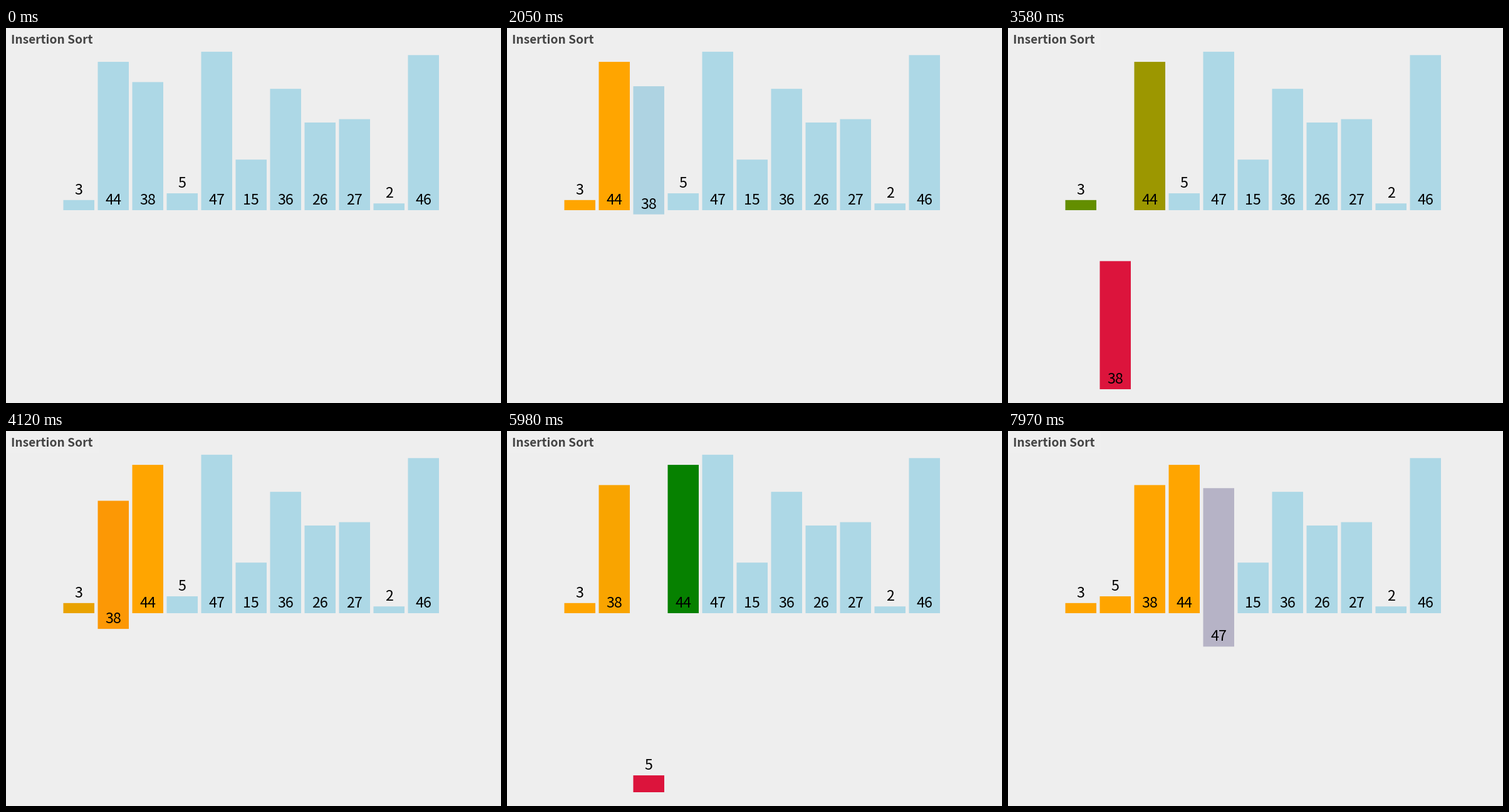
Animation of 790 by 599 pixels, one loop 8000 ms. Source, as a matplotlib script:

```python
import matplotlib.pyplot as plt
import numpy as np
from matplotlib.animation import FuncAnimation
from matplotlib.colors import to_rgb
from matplotlib.patches import Rectangle

W, H, DPI = 790, 599, 100
LOOP, TICK = 8000, 20
VALUES = [3, 44, 38, 5, 47, 15, 36, 26, 27, 2, 46]
X0, STEP, BAR_W = 91.5, 55, 49.5
BASE, DROP, UNIT = 291, 286, 5.385
IDLE, SORTED, ACTIVE, KEY = map(to_rgb, ("lightblue", "orange", "green", "crimson"))

# Steps begin at a fixed pace; each transition is redrawn every REDRAW ms.
FIRST, PACE, MOVE, REDRAW = -10, 493, 250, 45


def sort_states():
    """Yield rows of (slot, drop, r, g, b) per bar after each step of the sort."""
    state = np.array([(i, 0, *IDLE) for i in range(len(VALUES))], float)
    order = list(range(len(VALUES)))
    yield state.copy()
    state[0, 2:] = SORTED
    yield state.copy()
    for i in range(1, len(order)):
        key = order[i]
        state[key, 1:] = 1, *KEY
        yield state.copy()
        j, last = i - 1, None
        while j >= 0:
            bar = order[j]
            if last is not None:
                state[last, 2:] = SORTED
            state[bar, 2:] = ACTIVE
            last = bar
            yield state.copy()
            if VALUES[bar] <= VALUES[key]:
                break
            order[j], order[j + 1] = key, bar
            state[bar, 0], state[key, 0] = j + 1, j
            yield state.copy()
            j -= 1
        state[last, 2:] = SORTED
        state[key, 1:] = 0, *SORTED
        yield state.copy()


STATES = list(sort_states())


def ease(t):
    """Cubic in-out."""
    t = min(t, 1)
    return 4 * t**3 if t < 0.5 else 1 - 4 * (1 - t) ** 3


def state_at(ms):
    k, elapsed = divmod(ms - FIRST, PACE)
    p = ease(elapsed // REDRAW * REDRAW / MOVE)
    return STATES[k] * (1 - p) + STATES[k + 1] * p


def px(size):
    return size * 72 / DPI


plt.rcParams["font.family"] = "Noto Sans CJK JP"
fig = plt.figure(figsize=(W / DPI, H / DPI), dpi=DPI, facecolor="#eeeeee")
ax = fig.add_axes([0, 0, 1, 1])
ax.set(xlim=(0, W), ylim=(H, 0))
ax.axis("off")

ax.add_patch(Rectangle((0, 0), 148, 35, color="#efefef", lw=0))
ax.text(8, 25, "Insertion Sort", size=px(19.2), weight="bold", color="#444444")

bars, labels = [], []
for v in VALUES:
    bars.append(ax.add_patch(Rectangle((0, 0), BAR_W, v * UNIT, lw=0, snap=False)))
    labels.append(ax.text(0, 0, str(v), size=px(23.3), ha="center", va="baseline"))


def draw(n):
    rows = state_at(n * TICK + TICK // 2)
    for v, bar, label, (slot, drop, *rgb) in zip(VALUES, bars, labels, rows):
        x, bottom = X0 + STEP * slot, BASE + DROP * drop
        top = bottom - v * UNIT
        bar.set_xy((x, top))
        bar.set_facecolor(np.clip(rgb, 0, 1))
        label.set_position((x + BAR_W / 2, (top if v < 10 else bottom) - 9))
    return bars + labels


anim = FuncAnimation(fig, draw, frames=LOOP // TICK, interval=TICK,
                     repeat=True, repeat_delay=0)
plt.show()
```
